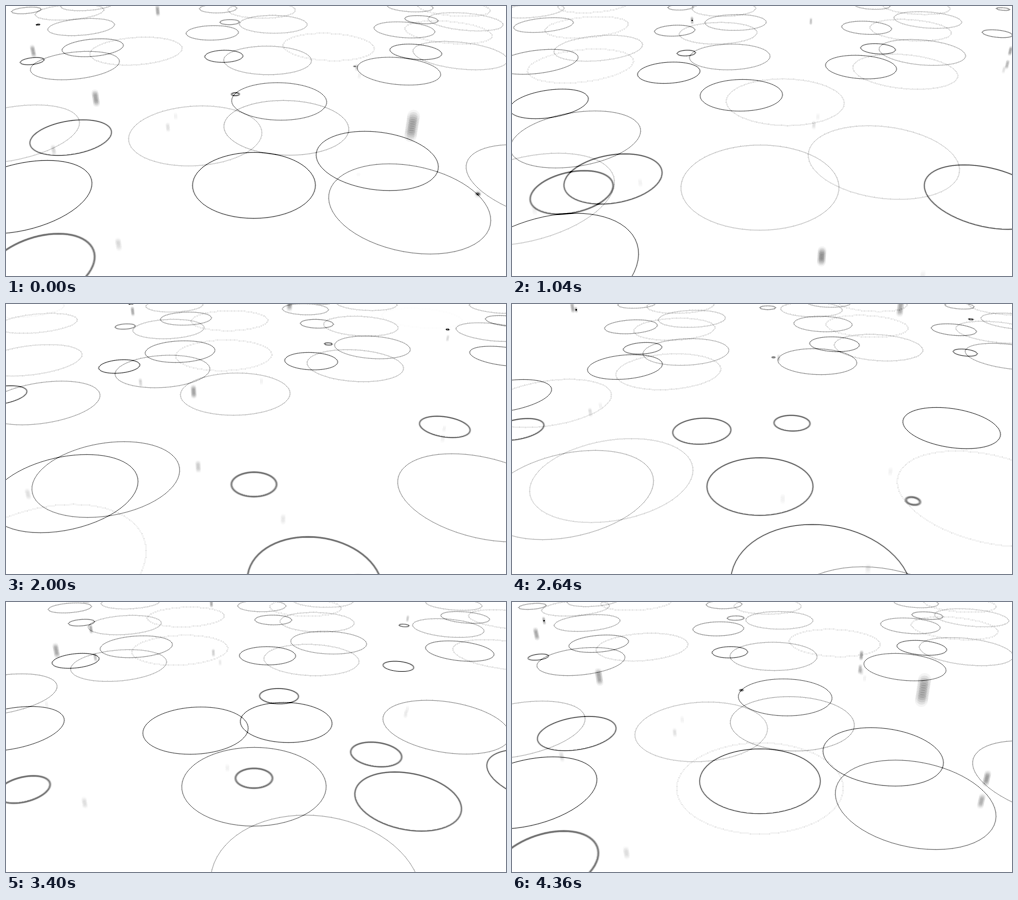
Write an HTML page with a canvas that moves like this. It is 500 px wide and 270 px high and loops after 4400 ms.

```html
<!DOCTYPE html>
<html lang="en">
<head>
<meta charset="utf-8">
<title>Rain rings</title>
<style>
html, body { margin: 0; width: 100%; height: 100%; overflow: hidden; background: #fff; }
canvas { display: block; }
</style>
</head>
<body>
<canvas id="stage" width="500" height="270"></canvas>
<script>
const ctx = document.getElementById('stage').getContext('2d');
const LOOP = 4400, STEP = 40, LIFE = 2800;
const FOCAL = 517, SIN = 0.464, COS = 0.885, HEIGHT = 3.51;
const GROWTH = 0.00093, FALL = 0.00487;
const SAMPLES = 10, SHUTTER = 28, SEGMENTS = 64;
const FAR_COUNT = 50, FAR_START = 8.7, FAR_END = 15.3;

// Large rings in the foreground: stage position and landing time (ms).
const foreground = [
  [248, 176, 3150], [248, 180, 1690], [190, 126.6, 2115], [280, 119, 2335],
  [370, 152, 3010], [401, 197, 2560], [472, 188, 4390], [438.5, 122.5, 1575],
  [65.5, 130.5, 3630], [18, 187, 3065], [35, 260, 3740], [60.5, 185, 435],
  [102, 171, 200], [308, 275, 1095], [371, 345, 375], [540, 174, 2350],
  [6, 125, 2215]
];

const drops = foreground.map(([x, y, time]) => {
  const z = FOCAL * HEIGHT / COS / (y + 136);
  return { x: (x - 250) * z * COS / FOCAL, z, time };
});

// The rest are spread evenly over the ground behind and over the loop.
const spread = (i, ratio) => (0.5 + i * ratio) % 1;
for (let i = 1; i <= FAR_COUNT; i++) {
  const near = FAR_START ** 2, far = FAR_END ** 2;
  const z = Math.sqrt(near + (far - near) * spread(i, 0.671));
  const x = (spread(i, 0.8192) - 0.5) * 0.88 * z;
  drops.push({ x, z, time: LOOP * spread(i, 0.5497) });
}

const circle = Array.from({ length: SEGMENTS }, (_, i) => {
  const a = i / SEGMENTS * 2 * Math.PI;
  return [Math.cos(a), Math.sin(a)];
});

function project(x, y, z) {
  const scale = FOCAL / (COS * z - SIN * y);
  return [250 + x * scale, 135 + (HEIGHT - SIN * z - COS * y) * scale, scale];
}

function drawRing({ x, z }, age) {
  const r = 1 - Math.exp(-GROWTH * age);
  const haze = Math.min(1, 10 / z);
  ctx.globalAlpha = 0.6 * haze / SAMPLES;
  ctx.lineWidth = 0.02 * FOCAL / (COS * z) * (1 - age / LIFE);
  ctx.beginPath();
  for (const [c, s] of circle) {
    const [px, py] = project(x + r * c, 0, z + r * s);
    ctx.lineTo(px, py);
  }
  ctx.closePath();
  ctx.stroke();
}

// Two nested discs give the drop a soft edge.
function drawDrop({ x, z }, y, alpha) {
  const [px, py, scale] = project(x, y, z);
  ctx.globalAlpha = alpha / SAMPLES;
  for (const radius of [0.036, 0.022]) {
    ctx.beginPath();
    ctx.arc(px, py, radius * scale, 0, 2 * Math.PI);
    ctx.fill();
  }
}

function drawScene(t) {
  for (const drop of drops) {
    const age = (t - drop.time + 2 * LOOP) % LOOP;
    if (age < LIFE) {
      drawRing(drop, age);
      continue;
    }
    const y = (LOOP - age) * FALL;
    if (y < 3.2) {
      drawDrop(drop, y, 0.4);
      drawDrop(drop, -y, 0.36 * Math.exp(-y)); // reflection
    }
  }
}

const start = performance.now();
let shown = -1;

function frame() {
  const t = Math.floor((performance.now() - start) % LOOP / STEP) * STEP;
  if (t !== shown) {
    shown = t;
    ctx.clearRect(0, 0, 500, 270);
    // Adding up alpha averages the samples into motion blur.
    ctx.globalCompositeOperation = 'lighter';
    for (let i = 0; i < SAMPLES; i++) {
      drawScene(t + SHUTTER * ((i + 0.5) / SAMPLES - 0.5));
    }
  }
  requestAnimationFrame(frame);
}
frame();
</script>
</body>
</html>
```
